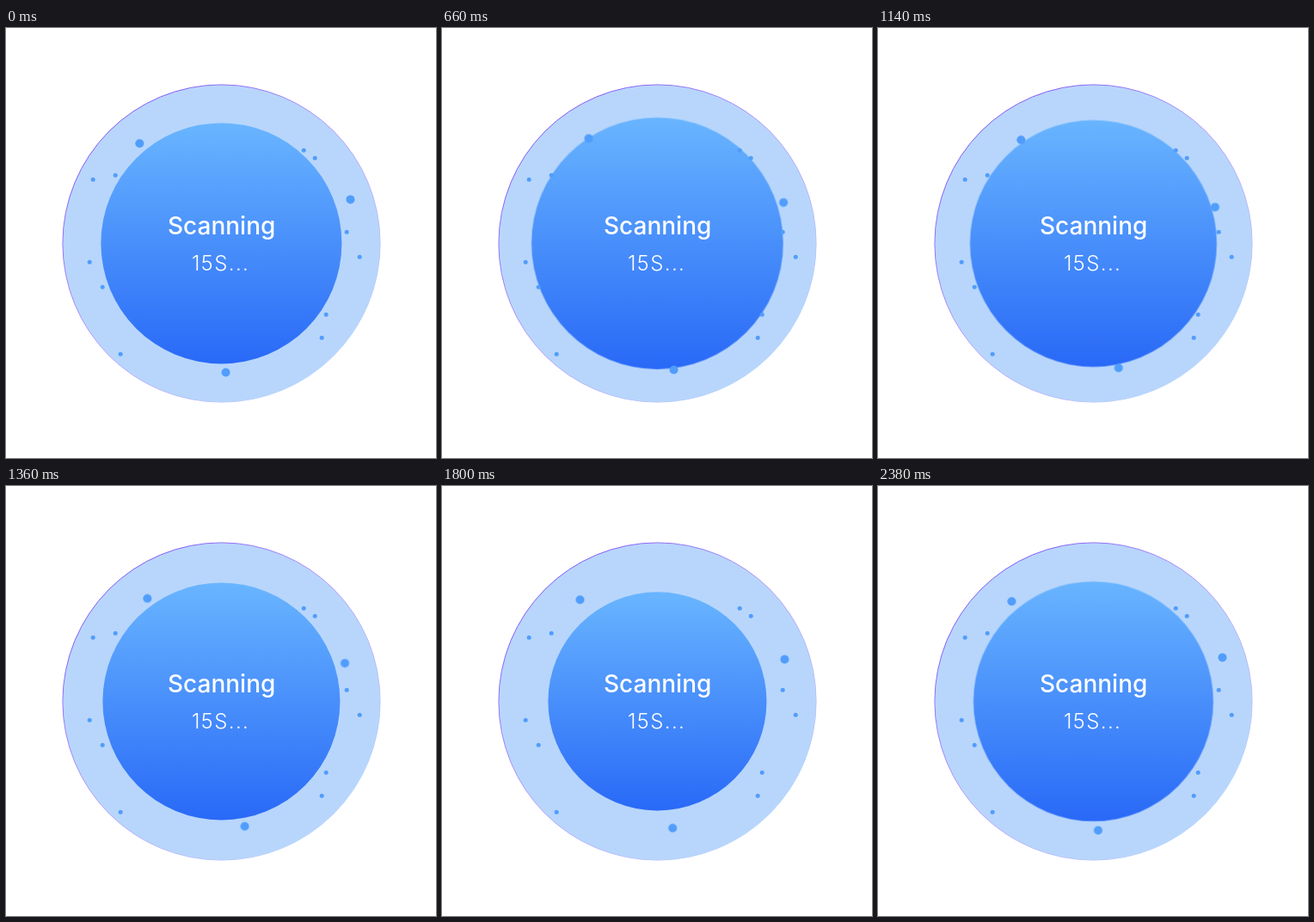
Animation of 500 by 500 pixels, one loop 2.4 s. Source, as an HTML page:

```html
<!DOCTYPE html>
<html lang="en">
<head>
<meta charset="utf-8">
<title>Scanning</title>
<style>
  html, body { margin: 0; width: 100%; height: 100%; overflow: hidden; background: #fff; }
  svg { display: block; width: 100vw; height: 100vh; }
  .dots { fill: #509dfb; }
  .disc, .a, .b, .c { animation: 2.4s linear infinite; }
  .disc { animation-name: pulse; transform-origin: 250.4px 250.4px; }
  .a { animation-name: drift-a; }
  .b { animation-name: drift-b; }
  .c { animation-name: drift-c; }
  text { font-family: Inter, sans-serif; fill: #fff; }
  .title { font-size: 28px; font-weight: 500; }
  .time { font-size: 24px; font-weight: 300; letter-spacing: 1.4px; }

  @keyframes pulse {
    0%, 100% { transform: scale(1); }
    38.5% { transform: scale(1.0635); }
    77.75% { transform: scale(.896); }
  }
  @keyframes drift-a {
    0%, 100% { transform: translate(0, 0); }
    22% { transform: translate(16.4px, -6.2px); }
  }
  @keyframes drift-b {
    0%, 15.5%, 83.75%, 100% { transform: translate(0, 0); }
    46.8% { transform: translate(-8.8px, 9px); }
  }
  @keyframes drift-c {
    0%, 100% { transform: translate(0, 0); }
    50% { transform: translate(25.5px, -5.5px); }
  }
</style>
</head>
<body>
<svg viewBox="0 0 500 500">
  <defs>
    <linearGradient id="fill" x2="0" y2="1">
      <stop offset="0" stop-color="#69b5ff"/>
      <stop offset="1" stop-color="#2969f7"/>
    </linearGradient>
    <linearGradient id="rim" x1=".1" y1=".1" x2=".8" y2=".9">
      <stop offset="0" stop-color="#7850f5"/>
      <stop offset=".5" stop-color="#b79df9"/>
      <stop offset="1" stop-color="#b8d6fc"/>
    </linearGradient>
  </defs>
  <circle cx="250.5" cy="250.5" r="184.6" fill="#b8d6fc" stroke="url(#rim)"/>
  <circle class="disc" cx="250.4" cy="250.4" r="140" fill="url(#fill)"/>
  <g class="dots">
    <g id="specks"></g>
    <circle class="a" cx="155.3" cy="134.3" r="5"/>
    <circle class="b" cx="400.5" cy="199.4" r="5"/>
    <circle class="c" cx="255.5" cy="400.5" r="5"/>
  </g>
  <text class="title" x="188" y="240">Scanning</text>
  <text class="time" x="216" y="281.5">15S...</text>
</svg>
<script>
  const specks = [
    [101, 176], [127, 171], [346, 142], [359, 151], [396, 237], [411, 266],
    [372, 333], [367, 360], [133, 379], [112, 301], [97, 272]
  ];
  document.getElementById('specks').innerHTML = specks
    .map(([x, y]) => `<circle cx="${x + .2}" cy="${y + .2}" r="2.5"/>`)
    .join('');
</script>
</body>
</html>
```
